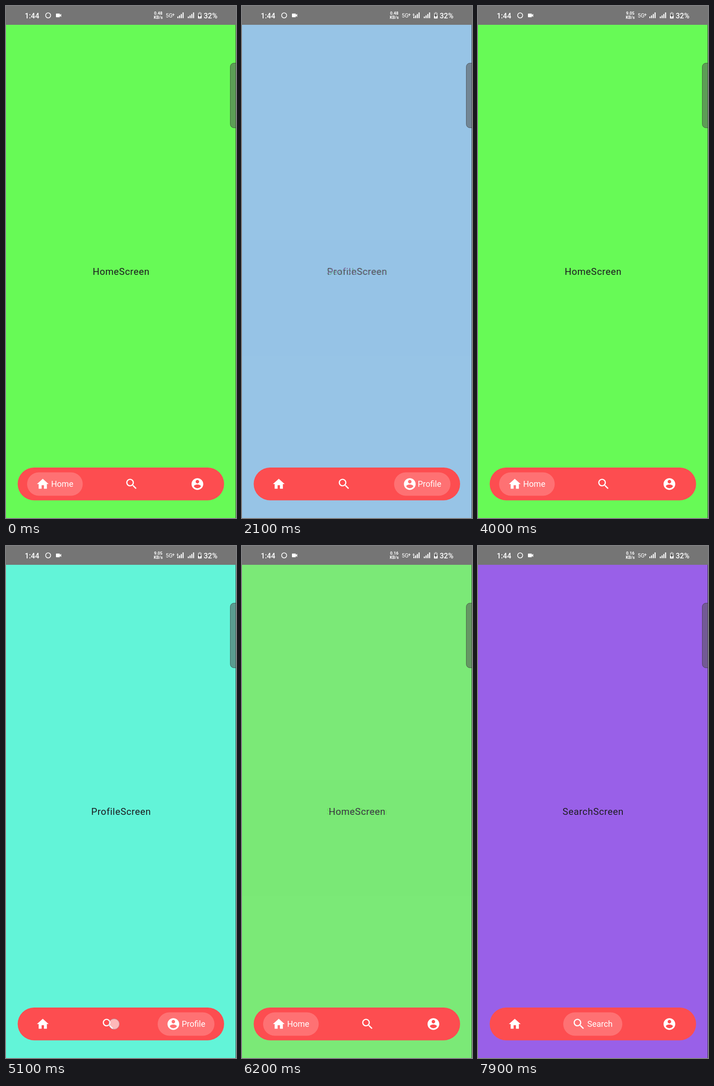
These frames come from a looping animation (502x1116 px, 8000 ms). An HTML page:

```html
<!DOCTYPE html>
<html lang="en">
<head>
<meta charset="utf-8">
<title>Bottom navigation</title>
<style>
  html, body { margin: 0; width: 100%; height: 100%; overflow: hidden; background: #fff; }
  svg { display: block; width: 502px; height: 1116px; font-family: Roboto, sans-serif; }
  .screen text { font-size: 20.5px; letter-spacing: .64px; text-anchor: middle; fill: #1b1b1f; }
  .label { font-size: 18px; fill: #fff; }
  .status { font-size: 16px; font-weight: 500; fill: #fff; }
  .speed { font-size: 9px; font-weight: 700; text-anchor: middle; }
</style>
</head>
<body>
<svg viewBox="0 0 502 1116">
  <g id="screens"></g>
  <rect x="501" y="41" width="1" height="1075" fill="#222" opacity=".75"/>
  <path d="M502 124.5H497.5a8 8 0 0 0-8 8V257.5a8 8 0 0 0 8 8H502" fill="#555" fill-opacity=".55" stroke="#333" stroke-opacity=".65"/>

  <rect width="502" height="41" fill="#757575"/>
  <g class="status">
    <text x="41" y="26.5">1:44</text>
    <circle cx="92" cy="20.5" r="5.5" fill="none" stroke="#fff" stroke-width="1.6"/>
    <path d="M110 16.5h6.500q1 0 1 1v2l3-2.500v7l-3-2.500v2q0 1-1 1h-6.500q-1 0-1-1v-6q0-1 1-1z"/>
    <text class="speed" id="speed" x="332.300" y="19"></text>
    <text class="speed" x="332.300" y="28.300">KB/s</text>
    <text x="348.500" y="25" font-size="12" font-weight="400">5G</text>
    <text x="362.500" y="22.500" font-size="10">+</text>
    <path id="bars" d="M374 23h2.300v3.500h-2.300zM377.800 20.500h2.300v6h-2.300zM381.600 17.500h2.300v9h-2.300zM385.400 14h2.300v12.500h-2.300z"/>
    <use href="#bars" x="22.800"/>
    <path id="arrows" d="M372.500 18.600l2-2.600 2 2.600zM372.500 19.600h4l-2 2.600z"/>
    <path d="M420 14.800h1.500v-1.600h3v1.600h1.500q1 0 1 1v5h-8v-5q0-1 1-1z" opacity=".5"/>
    <path d="M419 20.800h8v5.500q0 1-1 1h-6q-1 0-1-1z"/>
    <path d="M424 15.500l-4 6h2.500l-.800 4.500 4-6h-2.500z" fill="#333"/>
    <text x="431.500" y="26.500">32%</text>
  </g>

  <rect x="25.500" y="1006" width="450.500" height="71.500" rx="35.750" fill="#fd4d50"/>
  <g id="nav"></g>
  <circle id="dot" r="11.500" fill="#fff" stroke="#7f9db5" stroke-width="1"/>
</svg>
<script>
const HOME = 0, SEARCH = 1, PROFILE = 2;
const LOOP = 8000, FADE = 700;
const ITEM = 71.5, LEFT = 46, WIDTH = 409, LABEL_X = 52.5;

const tabs = [
  { name: 'Home', color: '#67fa56', label: 50,
    icon: 'M10 20v-6h4v6h5v-8h3L12 3 2 12h3v8z' },
  { name: 'Search', color: '#985ee8', label: 57.5,
    icon: 'M15.500 14h-.790l-.280-.270C15.410 12.590 16 11.110 16 9.500 16 5.910 13.090 3 9.500 3S3 5.910 3 9.500 5.910 16 9.500 16c1.610 0 3.090-.590 4.230-1.570l.270.280v.790l5 4.990L20.490 19l-4.990-5zm-6 0C7.010 14 5 11.990 5 9.500S7.010 5 9.500 5 14 7.010 14 9.500 11.990 14 9.500 14z' },
  { name: 'Profile', color: '#62f4d8', label: 52.5,
    icon: 'M12 2C6.480 2 2 6.480 2 12s4.480 10 10 10 10-4.480 10-10S17.520 2 12 2zm0 3c1.660 0 3 1.340 3 3s-1.340 3-3 3-3-1.340-3-3 1.340-3 3-3zm0 14.200c-2.500 0-4.710-1.280-6-3.220.030-1.990 4-3.080 6-3.080 1.990 0 5.970 1.090 6 3.080-1.290 1.940-3.500 3.220-6 3.220z' }
];

const taps = [
  { at: 1310, to: SEARCH, x: 262, y: 1040 },
  { at: 1803, to: PROFILE, x: 412, y: 1042 },
  { at: 2560, to: SEARCH, x: 236, y: 1042 },
  { at: 3318, to: HOME, x: 111, y: 1030 },
  { at: 4420, to: PROFILE, x: 412, y: 1042 },
  { at: 5150, to: SEARCH, x: 236, y: 1042 },
  { at: 5768, to: HOME, x: 100, y: 1036 },
  { at: 7320, to: SEARCH, x: 262, y: 1040 }
];

const $ = id => document.getElementById(id);
const clamp = v => Math.min(1, Math.max(0, v));

function add(parent, tag, attrs, text) {
  const node = document.createElementNS('http://www.w3.org/2000/svg', tag);
  set(node, attrs);
  if (text) node.textContent = text;
  return parent.appendChild(node);
}

function set(node, attrs) {
  for (const key in attrs) node.setAttribute(key, attrs[key]);
}

// cubic-bezier(.4, 0, .2, 1)
function ease(x) {
  let lo = 0, hi = 1;
  for (let i = 0; i < 20; i++) {
    const s = (lo + hi) / 2, r = 1 - s;
    if (1.2 * r * r * s + .6 * r * s * s + s * s * s < x) lo = s; else hi = s;
  }
  return lo * lo * (3 - 2 * lo);
}

// Critically damped spring, stiffness 400
function spring(ms) {
  const x = ms / 50;
  return 1 - (1 + x) * Math.exp(-x);
}

tabs.forEach((tab, i) => {
  tab.screen = add($('screens'), 'g', { class: 'screen' });
  add(tab.screen, 'rect', { y: 41, width: 502, height: 1075, fill: tab.color });
  add(tab.screen, 'text', { x: 251.3, y: 585.5 }, tab.name + 'Screen');

  tab.item = add($('nav'), 'g', {});
  tab.pill = add(tab.item, 'rect', { y: 1016.5, height: 51, rx: 25.5, fill: '#fff', opacity: .2 });
  add(tab.item, 'path', { d: tab.icon, fill: '#fff', transform: 'translate(18.9 1026.600) scale(1.28)' });
  const clip = add(tab.item, 'clipPath', { id: 'clip' + i });
  tab.window = add(clip, 'rect', { x: LABEL_X, y: 1020, height: 44 });
  const holder = add(tab.item, 'g', { 'clip-path': `url(#clip${i})` });
  tab.text = add(holder, 'text', { class: 'label', y: 1048.4 }, tab.name);
});

function drawScreens(from, to, k) {
  tabs.forEach((tab, i) => {
    const alpha = i === to ? k : i === from ? 1 - k : 0;
    set(tab.screen, { opacity: alpha, display: alpha > 0 ? 'inline' : 'none' });
  });
  // Only Home is covered by its successor; the others leave on top.
  const top = tabs[from === HOME ? to : from].screen;
  if ($('screens').lastChild !== top) $('screens').append(top);
}

function drawNav(from, to, k) {
  const open = tabs.map((tab, i) => i === to ? k : i === from ? 1 - k : 0);
  const widths = tabs.map((tab, i) => ITEM + tab.label * open[i]);
  const gap = (WIDTH - widths[0] - widths[1] - widths[2]) / 2;
  let x = LEFT;
  tabs.forEach((tab, i) => {
    const shown = tab.label * open[i];
    set(tab.item, { transform: `translate(${x} 0)` });
    set(tab.pill, { width: widths[i], display: i === to ? 'inline' : 'none' });
    set(tab.window, { width: shown });
    set(tab.text, { x: LABEL_X + shown - tab.label, opacity: open[i] });
    x += widths[i] + gap;
  });
}

function drawDot(t) {
  const tap = taps.find(p => t >= p.at - 60 && t < p.at + 100);
  if (tap) set($('dot'), { cx: tap.x, cy: tap.y });
  set($('dot'), { opacity: tap ? .6 * clamp((tap.at + 100 - t) / 80) : 0 });
}

function draw(t) {
  const n = taps.filter(p => p.at <= t).length;
  const to = n ? taps[n - 1].to : HOME;
  const from = n > 1 ? taps[n - 2].to : HOME;
  const age = n ? t - taps[n - 1].at : LOOP;
  drawScreens(from, to, age >= FADE ? 1 : ease(age / FADE));
  drawNav(from, to, spring(age));
  drawDot(t);
  $('speed').textContent = t < 2700 ? '0.48' : t < 5700 ? '9.05' : '0.16';
  const busy = t >= 800 && t < 3700 || t >= 4700 && t < 7100;
  set($('arrows'), { display: busy ? 'inline' : 'none' });
}

const start = performance.now();
function tick() {
  draw((performance.now() - start) % LOOP);
  requestAnimationFrame(tick);
}
tick();
</script>
</body>
</html>
```
